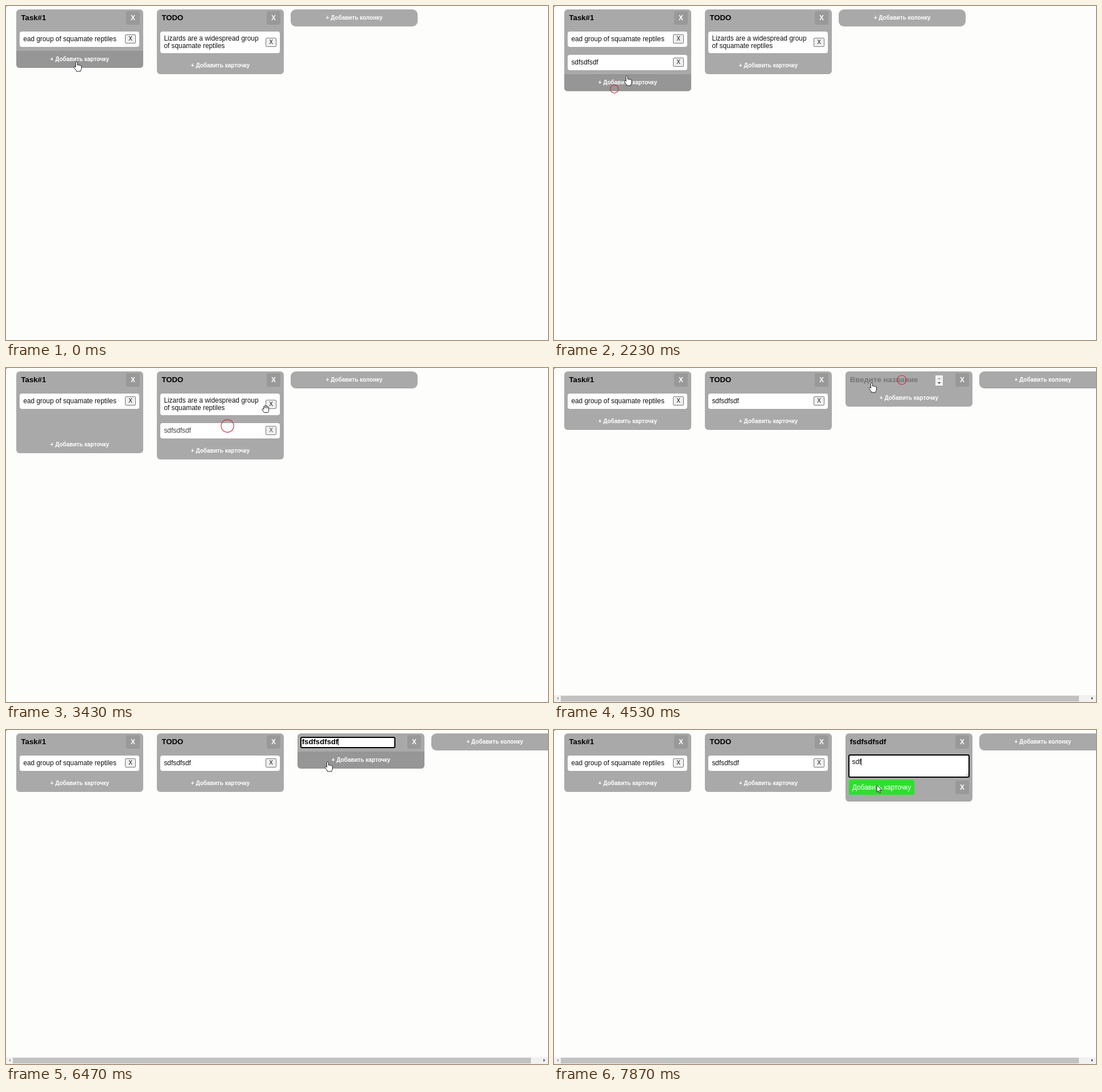
An HTML page that plays this animation: 952 by 588 pixels, repeating every 8000 ms.

```html
<!DOCTYPE html>
<html lang="ru">
<head>
<meta charset="utf-8">
<title>Board</title>
<style>
html, body { margin: 0; width: 100%; height: 100%; overflow: hidden; background: #fdfdfc; }
#stage { position: relative; width: 952px; height: 588px; overflow: hidden;
  font: 11.86px "Liberation Sans", Arial, sans-serif; color: #111; }
#stage div { position: absolute; box-sizing: border-box; white-space: pre; }
#board { inset: 0; }
#stage .col { background: #a9a9a9; border-radius: 6px; overflow: hidden; }
#stage .add { color: #fff; font-weight: bold; font-size: 10px; text-align: center; }
#stage .new { background: #a9a9a9; border-radius: 9px; }
#stage .hot { background: #969696; }
#stage .title { font-weight: bold; font-size: 13.2px; color: #000; }
#stage .hint { color: #757575; }
#stage .close { background: #999; color: #fff; font-weight: bold; text-align: center; border-radius: 3px; }
#stage .card { background: #fff; border-radius: 4px; }
#stage .del { background: #efefef; border: 1px solid #767676; border-radius: 2px; font-size: 10px; text-align: center; }
#stage .field { background: #fff; border: 2px solid #000; border-radius: 3px; }
#stage .ok { background: #2de02d; color: #fff; text-align: center; border-radius: 3px; }
#stage .bar { background: #f1f1f1; }
#stage .thumb { background: #c1c1c1; }
#stage svg { position: absolute; left: 0; top: 0; overflow: visible; }
.caret { display: inline-block; width: 1px; height: 12px; background: #000; vertical-align: -2px; }
</style>
</head>
<body>
<div id="stage">
  <div id="board"></div>
  <svg width="952" height="588">
    <rect width="1" height="1" fill="#000"/>
    <circle id="ring" fill="none" stroke="#c82c42" stroke-width="1.1"/>
    <path id="pointer" fill="#fff" stroke="#222" stroke-width="1" stroke-linejoin="round"/>
  </svg>
</div>
<script>
const LOOP = 8000;
const ADD_CARD = 'Добавить карточку';
const $ = id => document.getElementById(id);
const caret = '<i class="caret"></i>';

const shapes = {
  none: '',
  hand: 'M-1.5 9V1.5a1.5 1.5 0 0 1 3 0V6q1.3-.9 2.6.3 1.4-.7 2.5.5 1.9-.4 1.9 1.6V12q0 2-1.5 3.6V17H-.5v-1.2L-4.3 10.5q-.9-1.5.3-2.1 1-.4 2.5 1.3z',
  grab: 'M-3.5 8V2.8q1.2-1.4 2.2 0V1.4q1.2-1.4 2.4 0v1q1.3-1.2 2.3.2v1.2q1.4-1 2.2.4V9q0 3-1.6 4.5H-2.3L-6 8.6q-.7-1.5.6-1.8 1 0 1.9 1.2zM-1.3 2.8V6M1.1 2.4V6M3.4 3.8V6',
  arrow: 'M0 0V12.5L2.8 9.8 4.7 14.2 6.6 13.4 4.7 9.1H8.6z',
  beam: 'M-2.5-6h5M0-6v12M-2.5 6h5'
};
const kinds = [[0, 'hand'], [500, 'beam'], [870, 'none'], [1630, 'beam'], [1840, 'arrow'],
  [1990, 'hand'], [2380, 'grab'], [3880, 'arrow'], [4090, 'hand'], [5270, 'none'],
  [6170, 'hand'], [6560, 'beam'], [7200, 'none'], [7500, 'beam'], [7690, 'arrow']];

// time, x, y of the pointer's hot spot
const path = [[0, 124, 98], [500, 128, 92], [1630, 128, 92], [1980, 106, 146], [2230, 128, 123],
  [2480, 136, 104], [3040, 389, 102], [3430, 456, 65], [3700, 466, 64], [3780, 466, 64],
  [4200, 611, 21], [4270, 611, 21], [4530, 558, 26], [4950, 556, 22], [6170, 556, 22],
  [6470, 565, 56], [6560, 565, 60], [7500, 565, 60], [7860, 567, 97]];
const clicks = [500, 1980, 3040, 3700, 4250, 4950, 6560];

const clamp = v => Math.max(0, Math.min(1, v));
const smooth = v => (v = clamp(v), v * v * (3 - 2 * v));
const mix = (a, b, k) => a + (b - a) * k;
const typed = (text, t, start, step) =>
  text.slice(0, Math.max(0, Math.floor((t - start) / step) + 1));

function at(t) {
  let i = 0;
  while (i < path.length - 1 && path[i + 1][0] <= t) i++;
  const a = path[i], b = path[i + 1] || a;
  const k = smooth((t - a[0]) / (b[0] - a[0] || 1));
  return [mix(a[1], b[1], k), mix(a[2], b[2], k)];
}

const box = (cls, x, y, w, h, text = '', style = '') =>
  `<div class="${cls}" style="left:${x}px;top:${y}px;width:${w}px;height:${h}px;line-height:${h}px;${style}">${text}</div>`;
const label = (cls, x, mid, text, style = '') => box(cls, x, mid - 7, 200, 14, text, style);
const cross = (x, y, h = 24) => box('close', x, y, 24, h, 'X');

function card(x, y, lines, style = '') {
  const h = lines.length > 1 ? 38.5 : 27.5, mid = h / 2;
  const rows = lines.length > 1
    ? label('', 6.4, 12.5, lines[0]) + label('', 6.4, 25.5, lines[1])
    : label('', 6.4, 13, lines[0]);
  return `<div class="card" style="left:${x}px;top:${y}px;width:210px;height:${h}px;${style}">`
    + rows + box('del', 185, mid - 8, 19, 16, 'X', 'line-height:14px') + '</div>';
}

// foot: top of the area under the cards; form: text being written or null
function column(x, title, foot, form, hot) {
  let s = box('col', x, 6, 223, foot - 6 + (form === null ? 30 : 88));
  s += title + cross(x + 193, 9);
  if (form === null) {
    s += box('add' + (hot ? ' hot' : ''), x, foot, 223, 30, '+ ' + ADD_CARD,
      'border-radius:0 0 6px 6px;line-height:29px');
  } else {
    s += box('field', x + 5, foot + 5, 213, 41)
      + label('', x + 11.5, foot + 18, form + caret)
      + `<svg width="1" height="1"><path d="M${x + 211} ${foot + 43}l5-5m-2 5l2-2" stroke="#888" fill="none"/></svg>`
      + box('ok', x + 6, foot + 50, 115, 26, ADD_CARD)
      + cross(x + 193, foot + 51);
  }
  return s;
}

function nameField(t) {
  const text = typed('fsdfsdfsdf', t, 5270, 65);
  const focus = t >= 4950 && t < 6560;
  let s = focus ? box('field', 517, 11.5, 167, 20.5) : '';
  s += text
    ? label('title', 519.7, 21, text + (focus ? caret : ''))
    : label('title hint', 519.7, 21, (focus ? caret : '') + 'Введите название');
  if (!text) {
    s += box('bar', 670, 13, 13, 18)
      + '<svg width="1" height="1"><path d="M673.500 20h6l-3-3z" fill="#aaa"/><path d="M673.500 25h6l-3 3z" fill="#555"/></svg>';
  }
  return s;
}

function board(t, px, py) {
  const over = (x, y, w, h) => px >= x && px < x + w && py >= y && py < y + h;
  const dragging = t >= 2480 && t < 3450;
  const made = t >= 1980, moved = t >= 3450, removed = t >= 3700, third = t >= 4250;
  const foot1 = made && !moved ? 120 : 79;
  const foot2 = removed ? 79 : 90 + 41 * smooth((t - 2720) / 200);
  const form1 = t >= 500 && !made ? typed('sdfsdfsdf', t, 870, 60) : null;
  const hot = (x, y) => !dragging && over(x, y, 223, 30);

  let s = column(18, label('title', 26.5, 21, 'Task#1'), foot1, form1, hot(18, foot1))
    + column(265, label('title', 273.5, 21, 'TODO'), foot2, null, hot(265, foot2))
    + card(24, 44.5, ['ead group of squamate reptiles']);
  if (!removed) s += card(271, 44.5, ['Lizards are a widespread group', 'of squamate reptiles']);

  if (third) {
    const form = t >= 6560 ? typed('sdf', t, 7200, 60) : null;
    s += column(512, nameField(t), 38, form, hot(512, 38));
  }
  const addX = third ? 747 : 500;
  s += box('add new' + (over(addX, 6, 223, 30) ? ' hot' : ''), addX, 6, 223, 30, '+ Добавить колонку');

  if (made) {
    let x = 24, y = 85.5, style = '';
    if (removed) { x = 271; y = 44.5; }
    else if (moved) { x = 271; y = 96.5; }
    else if (dragging) {
      const [hx, hy] = at(Math.min(t, 3040)), drop = smooth((t - 3040) / 340);
      x = mix(24 + hx - 136, 271, drop);
      y = mix(85.5 + hy - 104, 96.5, drop);
      style = 'color:#444';
    }
    s += card(x, y, ['sdfsdfsdf'], style);
  }
  if (third) {
    s += box('bar', 0, 576, 952, 12) + box('thumb', 12, 577, 910, 10)
      + '<svg width="1" height="1"><path d="M8 579v5l-3-2.500z" fill="#999"/><path d="M944 579v5l3-2.500z" fill="#444"/></svg>';
  }
  return s;
}

let shown = '';
function draw(t) {
  const [x, y] = at(t);
  const html = board(t, x, y);
  if (html !== shown) $('board').innerHTML = shown = html;

  const kind = kinds.filter(k => k[0] <= t).pop()[1];
  $('pointer').setAttribute('d', shapes[kind]);
  $('pointer').setAttribute('transform', `translate(${x.toFixed(1)} ${y.toFixed(1)})`);
  $('pointer').setAttribute('fill', kind === 'beam' ? 'none' : '#fff');

  const hit = clicks.filter(c => c <= t && t - c < 570).pop();
  const [cx, cy] = at(hit || 0);
  $('ring').setAttribute('cx', cx);
  $('ring').setAttribute('cy', cy);
  $('ring').setAttribute('r', hit ? (t - hit) * 0.0285 : 0);
}

const start = performance.now();
function tick() {
  draw((performance.now() - start) % LOOP);
  requestAnimationFrame(tick);
}
tick();
</script>
</body>
</html>
```
